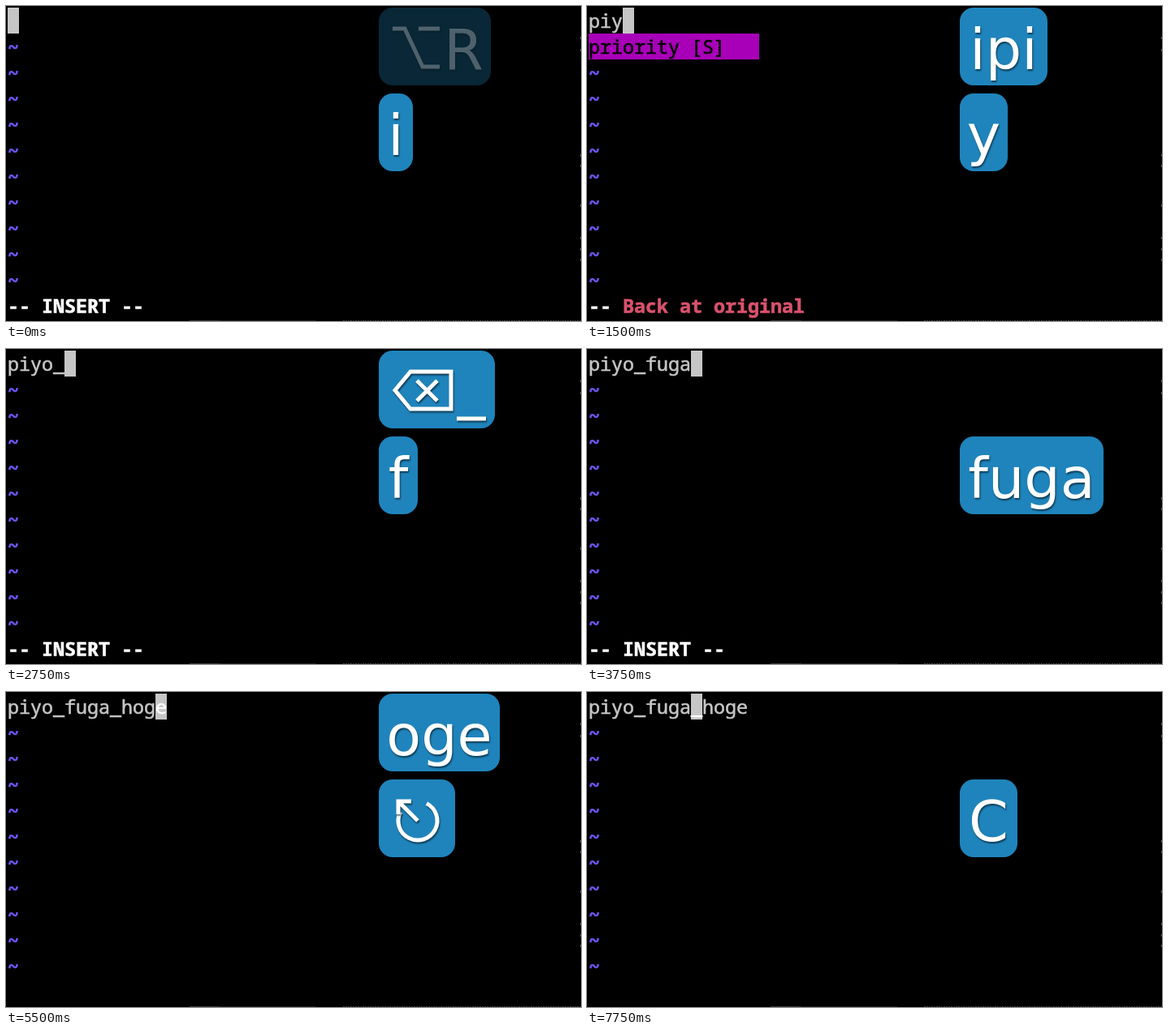
An HTML page with a canvas for the animation above (8 s loop, 708 by 389 pixels).

```html
<!DOCTYPE html>
<html lang="en">
<head>
<meta charset="utf-8">
<title>Completion in a terminal editor</title>
<style>
html, body { margin: 0; width: 100%; height: 100%; overflow: hidden; background: #000; }
canvas { display: block; }
</style>
</head>
<body>
<canvas id="stage" width="708" height="389"></canvas>
<script>
const ctx = document.getElementById('stage').getContext('2d');
const LOOP = 8000, CELL = 14, ROW = 32, LEFT = 2, TOP = 2, KEY_PAD = 11;
const GREY = '#c6c6c6', PURPLE = '#a800b8', VIOLET = '#7059fa', PINK = '#d9526c';
const INSERT = '-- INSERT --', BACK = 'Back at original';
const OPTION = '\u2325', ERASE = '\u232b', ESC = '\u238b';

const words = ['psubi', 'pid', 'pipe', 'ppid', 'plit', 'pair', 'printf',
  'priority', 'perlString', 'perlVarPlain'];
const fullMenu = {
  rows: words.map((w, i) => w.padEnd(26) + (i ? '[S]' : '[nsnip] =head2 $')),
  cells: 44, bar: true
};
const shortMenu = { rows: ['priority [S]'], cells: 15 };

// Each step changes only the listed parts; a key is [label, opacity].
const steps = [
  [0, { text: '', cursor: 0, status: INSERT, menu: null, upper: [OPTION + 'R', .29], lower: ['i', 1] }],
  [250, { upper: null }],
  [500, { text: 'p', cursor: 1, menu: fullMenu, status: BACK, lower: ['ip', 1] }],
  [750, { text: 'pi', cursor: 2, lower: ['ipi', 1] }],
  [1500, { text: 'piy', cursor: 3, menu: shortMenu, upper: ['ipi', 1], lower: ['y', 1] }],
  [1750, { text: 'piyo', cursor: 4, menu: null, status: INSERT, lower: ['yo', 1] }],
  [2000, { upper: ['ipi', .29] }],
  [2250, { upper: ['yo', 1], lower: [ERASE, 1] }],
  [2500, { text: 'piyo_', cursor: 5, lower: [ERASE + '_', 1] }],
  [2750, { upper: [ERASE + '_', 1], lower: ['f', 1] }],
  [3000, { text: 'piyo_f', cursor: 6, lower: ['fu', 1] }],
  [3250, { text: 'piyo_fug', cursor: 8, lower: ['fug', 1] }],
  [3500, { text: 'piyo_fuga', cursor: 9, lower: ['fuga', 1] }],
  [3750, { upper: null }],
  [4000, { text: 'piyo_fuga_', cursor: 10, upper: ['fuga', 1], lower: ['_', 1] }],
  [4250, { text: 'piyo_fuga_h', cursor: 11, lower: ['_h', 1] }],
  [4500, { text: 'piyo_fuga_ho', cursor: 12, upper: ['_h', 1], lower: ['o', 1] }],
  [4750, { text: 'piyo_fuga_hoge', cursor: 14, lower: ['oge', 1] }],
  [5250, { cursor: 13, status: '', upper: ['oge', 1], lower: [ESC, 1] }],
  [5750, { cursor: 12, upper: [ESC, 1], lower: ['h', 1] }],
  [6000, { cursor: 11, lower: ['hh', 1] }],
  [6250, { cursor: 10, lower: ['hhh', 1] }],
  [6500, { cursor: 9, upper: ['hhh', 1], lower: ['h', 1] }],
  [7000, { upper: ['hhh', .29] }],
  [7250, { upper: null }],
  [7500, { lower: ['h', .29] }],
  [7750, { lower: ['C', 1] }]
];
// The growing word is shown one letter at a time.
steps.find(([start]) => start === 3250)[1].cursor = 'piyo_fug'.length;

const advance = { i: 20, p: 46, y: 37, f: 26, h: 44, _: 36, C: 49, R: 45, o: 43, g: 44, e: 40,
  u: 44, a: 41, [OPTION]: 71, [ERASE]: 85, [ESC]: 72 };

function stateAt(time) {
  return Object.assign({}, ...steps.filter(([start]) => start <= time).map(([, part]) => part));
}

function rect(color, x, y, w, h) {
  ctx.fillStyle = color;
  ctx.fillRect(x, y, w, h);
}

function print(text, col, row, color, weight = 500) {
  const x = LEFT + col * CELL, y = TOP + row * ROW + 25;
  ctx.font = `${weight} ${CELL / .6}px "Noto Sans Mono", monospace`;
  ctx.fillStyle = ctx.strokeStyle = color;
  ctx.lineWidth = .6;
  ctx.fillText(text, x, y);
  ctx.strokeText(text, x, y);
}

function stroke(...lines) {
  ctx.beginPath();
  for (const line of lines) line.forEach(([x, y], i) => i ? ctx.lineTo(x, y) : ctx.moveTo(x, y));
  ctx.stroke();
}

// Symbol paths start at the pen position, with y from the top of the key.
const symbols = {
  _() {
    stroke([[0, 84], [36, 84]]);
  },
  [OPTION]() {
    stroke([[6, 26], [21, 26], [43, 73], [64, 73]], [[38, 26], [64, 26]]);
  },
  [ERASE]() {
    stroke([[9, 49], [28, 26], [78, 26], [78, 72], [28, 72], [9, 49], [28, 26]],
      [[36, 37], [61, 62]], [[61, 37], [36, 62]]);
  },
  [ESC]() {
    ctx.beginPath();
    ctx.arc(37, 51, 24, -Math.PI * .35, Math.PI * 1.15);
    ctx.stroke();
    stroke([[37, 51], [13, 27]], [[13, 43], [13, 27], [29, 27]]);
  }
};

const labelWidth = label => [...label].reduce((sum, c) => sum + advance[c], 0);

function drawKey(key, y) {
  if (!key) return;
  let [label, opacity] = key;
  ctx.save();
  ctx.translate(459, y);
  ctx.globalAlpha = opacity;
  ctx.fillStyle = 'rgba(38, 162, 230, .82)';
  ctx.beginPath();
  ctx.roundRect(0, 0, labelWidth(label) + 2 * KEY_PAD, 96, 17);
  ctx.fill();

  ctx.shadowColor = 'rgba(0, 0, 0, .55)';
  ctx.shadowOffsetX = 1;
  ctx.shadowOffsetY = 2;
  ctx.shadowBlur = 2;
  ctx.fillStyle = ctx.strokeStyle = '#fff';
  ctx.lineWidth = 5;
  ctx.font = '70px "DejaVu Sans", sans-serif';
  ctx.textAlign = 'center';
  ctx.translate(KEY_PAD, 0);
  while (symbols[label[0]]) {
    symbols[label[0]]();
    ctx.translate(advance[label[0]], 0);
    label = label.slice(1);
  }
  ctx.fillText(label, labelWidth(label) / 2, 76);
  ctx.restore();
}

function drawMenu({ rows, cells, bar }) {
  const width = cells * CELL, height = rows.length * ROW;
  rect(PURPLE, LEFT, TOP + ROW, width, height);
  if (bar) rect(GREY, LEFT + width, TOP + ROW, CELL, height);
  rows.forEach((row, i) => print(row, 0, i + 1, '#000'));
}

function drawEdges() {
  rect('#333', 226, 388, 38, 1);
  rect('#1c1c1c', 264, 388, 118, 1);
  for (let x = 415; x < 708; x += 3) {
    const shade = 35 + 30 * Math.abs(Math.sin(x * 1.7));
    rect(`rgb(${shade}, ${shade}, ${shade})`, x, 388, 2, 1);
  }
  for (const y of [38, 53, 183, 196, 245, 285, 299, 312]) rect('#555', 707, y, 1, 3);
}

function draw(time) {
  const { text, cursor, status, menu, upper, lower } = stateAt(time);
  rect('#000', 0, 0, 708, 389);
  drawEdges();
  for (let row = 1; row <= 10; row++) print('~', 0, row, VIOLET, 700);
  print(text, 0, 0, GREY);
  rect(GREY, LEFT + cursor * CELL, TOP, CELL, ROW);
  if (text[cursor]) print(text[cursor], cursor, 0, '#fff');
  if (menu) drawMenu(menu);
  if (status === BACK) {
    print('--', 0, 11, '#fff', 700);
    print(BACK, 3, 11, PINK, 700);
  } else {
    print(status, 0, 11, '#fff', 700);
  }
  drawKey(upper, 2);
  drawKey(lower, 108);
}

const began = performance.now();
function tick() {
  draw((performance.now() - began) % LOOP);
  requestAnimationFrame(tick);
}
tick();
</script>
</body>
</html>
```
